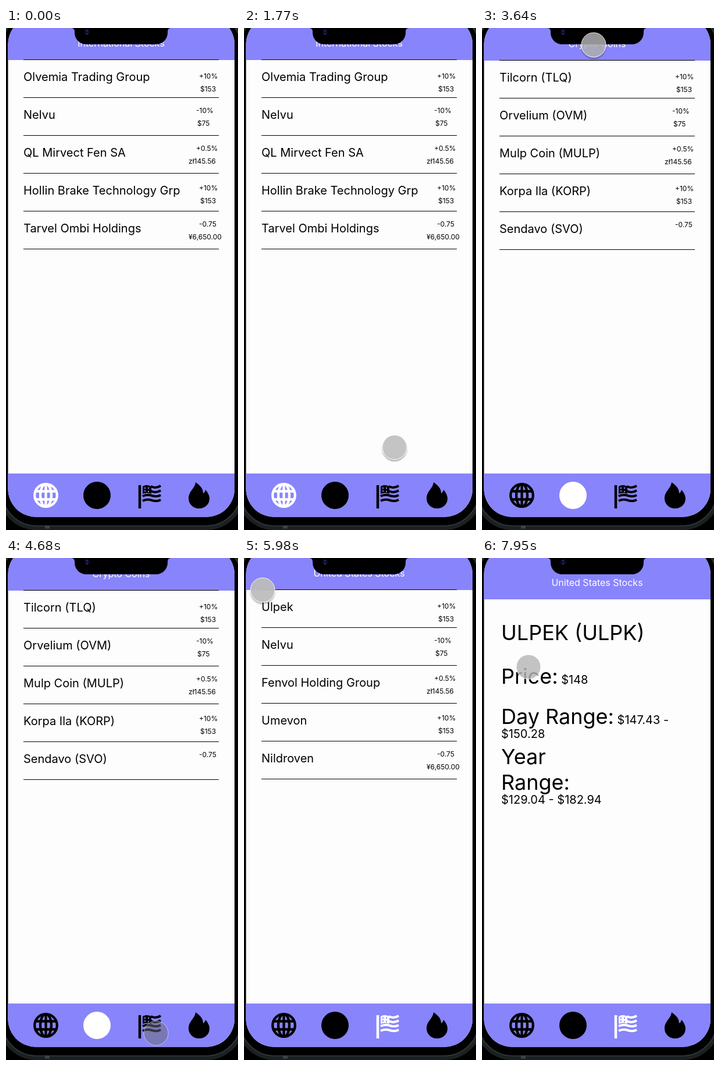
An HTML page for the animation above (8000 ms loop, 399 by 862 pixels).

```html
<!DOCTYPE html>
<html lang="en">
<head>
<meta charset="utf-8">
<title>Stocks app</title>
<style>
  html, body { margin: 0; width: 100%; height: 100%; overflow: hidden; background: #000; }
  svg { display: block; font-family: Inter, sans-serif; }
  .name { font-size: 20px; }
  .small { font-size: 12px; }
  .big { font-size: 36px; }
  .big tspan, .value { font-size: 20px; }
  .title { font-size: 16px; fill: #fff; text-anchor: middle; }
  .bar { fill: #8884fc; }
  .icon { color: #000; }
  .icon.active { color: #fff; }
</style>
</head>
<body>
<svg width="399" height="862" viewBox="0 0 399 862">
  <defs>
    <clipPath id="screen"><rect x="3.500" y="-20" width="389.500" height="859.500" rx="48"/></clipPath>
    <filter id="shadow" x="-30%" y="-30%" width="160%" height="160%">
      <feDropShadow dx="0" dy="2.500" stdDeviation="1.300" flood-opacity=".35"/>
    </filter>
  </defs>

  <g fill="none">
    <rect x="-10" y="-29" width="417" height="887" rx="63" stroke="#1b2122" stroke-width="8"/>
    <rect x="-8" y="-27" width="413" height="882" rx="61" stroke="#2f3738" stroke-width="1.500"/>
    <path d="M67 857h8" stroke="#3d4546" stroke-width="5"/>
  </g>

  <g clip-path="url(#screen)">
    <rect width="399" height="862" fill="#fdfdfe"/>
    <g id="pages"></g>
    <rect class="bar" y="765" width="399" height="80"/>
    <g class="icon" fill="none" stroke="currentColor" stroke-width="4.300">
      <circle cx="68.500" cy="802.500" r="19.300"/>
      <ellipse cx="68.500" cy="802.500" rx="9.500" ry="19.300"/>
      <path d="M68.500 783v39M51 795.500h35M51 809.500h35"/>
    </g>
    <g class="icon"><circle cx="156.500" cy="802.500" r="23.500" fill="currentColor"/></g>
    <g class="icon" id="flag" fill="none" stroke="currentColor" stroke-width="4">
      <path d="M230 785v40" stroke-width="4.500"/>
      <path d="M235 787c6-3 10-2 15 0v13c-5-2-9-2-15 0z" fill="currentColor" stroke="none"/>
    </g>
    <g class="icon">
      <path fill="currentColor" d="M326 780c10 7 13 12 13 19c2-1 3.500-3 4-6C347 797 350 803 350 808C350 818 342 825 332 825C322 825 314 817.500 314 808C314 795 325 791 326 780z"/>
    </g>
  </g>

  <path d="M112 0q6 0 6 6v2a20 20 0 0 0 20 20h120a20 20 0 0 0 20-20v-2q0-6 6-6z"/>
  <circle cx="139.500" cy="7" r="5" fill="#0a0a24"/>
  <path d="M139.500 3.500v2.500M139.500 8.500v2.500" stroke="#25257c" stroke-width="3"/>
  <circle id="cursor" r="21" stroke="#fff"/>
</svg>

<script>
const $ = selector => document.querySelector(selector);
const text = (cls, x, y, content) => `<text class="${cls}" x="${x}" y="${y}">${content}</text>`;

const header = (title, bottom) =>
  `<rect class="bar" width="399" height="${bottom}"/>` + text('title', 198, bottom - 23, title);

// change, its x, price, its x, baseline offset inside the row
const quotes = [
  ['+10%', 332, '$153', 334, 33],
  ['-10%', 327, '$75', 329, 27],
  ['+0.5%', 327, 'zł145.56', 314, 27],
  ['+10%', 332, '$153', 334, 30],
  ['-0.75', 332, '¥6,650.00', 314, 27],
];

function listPage(title, top, names, hideLast) {
  const rows = names.map((name, i) => {
    const y = top + 65 * i;
    const [change, changeX, price, priceX, dy] = quotes[i];
    return text('name', 30, y + 37, name) +
      text('small', changeX, y + dy, change) +
      (hideLast && i === 4 ? '' : text('small', priceX, y + dy + 22, price));
  });
  let lines = '';
  for (let i = 0; i < 6; i++) lines += `M30 ${top + 65 * i + .5}h336`;
  return header(title, top + 1) + rows.join('') + `<path d="${lines}" stroke="#000"/>`;
}

const detailPage = header('United States Stocks', 71) +
  text('big', 33, 141, 'ULPEK (ULPK)') +
  text('big', 33, 216, 'Price:<tspan> $148</tspan>') +
  text('big', 33, 285, 'Day Range:<tspan> $147.43 -</tspan>') +
  text('value', 33, 309, '$150.28') +
  text('big', 33, 354, 'Year') +
  text('big', 33, 398, 'Range:') +
  text('value', 33, 422, '$129.04 - $182.94');

const pages = [
  { start: 0, icon: 0, html: listPage('International Stocks', 54, ['Olvemia Trading Group', 'Nelvu',
    'QL Mirvect Fen SA', 'Hollin Brake Technology Grp', 'Tarvel Ombi Holdings']) },
  { start: 2650, icon: 1, html: listPage('Crypto Coins', 55, ['Tilcorn (TLQ)', 'Orvelium (OVM)',
    'Mulp Coin (MULP)', 'Korpa Ila (KORP)', 'Sendavo (SVO)'], true) },
  { start: 4950, icon: 2, html: listPage('United States Stocks', 54, ['Ulpek', 'Nelvu',
    'Fenvol Holding Group', 'Umevon', 'Nildroven']) },
  { start: 6780, icon: 2, html: detailPage },
];
$('#pages').innerHTML = pages.map(p => `<g>${p.html}</g>`).join('');

// flag stripes, shorter beside the canton
let flag = '';
for (let i = 0; i < 4; i++) {
  const y = 788 + 8 * i;
  flag += i < 2 ? `<path d="M249 ${y - 1}c6 3 11 3 17-1"/>`
                : `<path d="M235 ${y}c5-3 10-3 16-1s10 2 15-1"/>`;
}
for (const [x, y] of [[239, 790], [245, 790], [239, 795], [245, 796]])
  flag += `<circle class="bar" cx="${x}" cy="${y}" r="1.2" stroke="none"/>`;
$('#flag').innerHTML += flag;

// pointer path: step, x, y, opacity
const STEP = 144.6;
const path = [
  [2, 188, 731, 1], [6, 229, 683, 1], [8, 229, 679, 1], [11, 229, 679, 1],
  [12, 259, 720, 1], [13, 273, 742, 1], [16, 158, 804, .9], [20, 158, 804, .9],
  [23, 212, 380, 1], [25, 192, 29, .8], [27, 81, 110, 1], [30, 180, 620, 1],
  [32, 258, 816, 1], [36, 258, 816, 1], [37, 274, 700, 1], [40, 60, 110, 1],
  [41, 32, 55, .92], [42, 21, 62, 1], [43, 54, 82, 1], [49, 54, 82, 1],
  [54, 118, 145, 1], [55, 80, 187, .82],
];
const presses = [[17, 18], [32, 34], [44, 46]];

function pointerAt(step) {
  const i = Math.max(1, path.findIndex(key => key[0] >= step));
  const [a, b] = [path[i - 1], path[i]];
  const f = (step - a[0]) / (b[0] - a[0]);
  return a.map((v, n) => v + (b[n] - v) * f);
}

const groups = [...$('#pages').children];
const icons = [...document.querySelectorAll('.icon')];
const cursor = $('#cursor');

function draw(now) {
  const t = now % 8000;
  const current = pages.findLastIndex(p => t >= p.start);
  groups.forEach((g, i) => g.style.display = i === current ? '' : 'none');
  icons.forEach((icon, i) => icon.classList.toggle('active', i === pages[current].icon));

  const step = Math.min(55, Math.floor((t + 12) / STEP));
  cursor.style.display = step < 2 ? 'none' : '';
  if (step >= 2) {
    const [, x, y, opacity] = pointerAt(step);
    const pressed = presses.some(([from, to]) => step >= from && step <= to);
    // the same grey over white at any opacity
    const grey = pressed ? 110 : 255 - 59 / opacity;
    cursor.setAttribute('transform', `translate(${x} ${y})`);
    cursor.setAttribute('fill', `rgb(${grey} ${grey} ${grey})`);
    cursor.setAttribute('fill-opacity', pressed ? .5 : opacity);
    cursor.setAttribute('stroke-opacity', pressed ? .5 : .9);
    cursor.setAttribute('filter', pressed || step === 55 ? 'none' : 'url(#shadow)');
  }
  requestAnimationFrame(draw);
}
requestAnimationFrame(draw);
</script>
</body>
</html>
```
